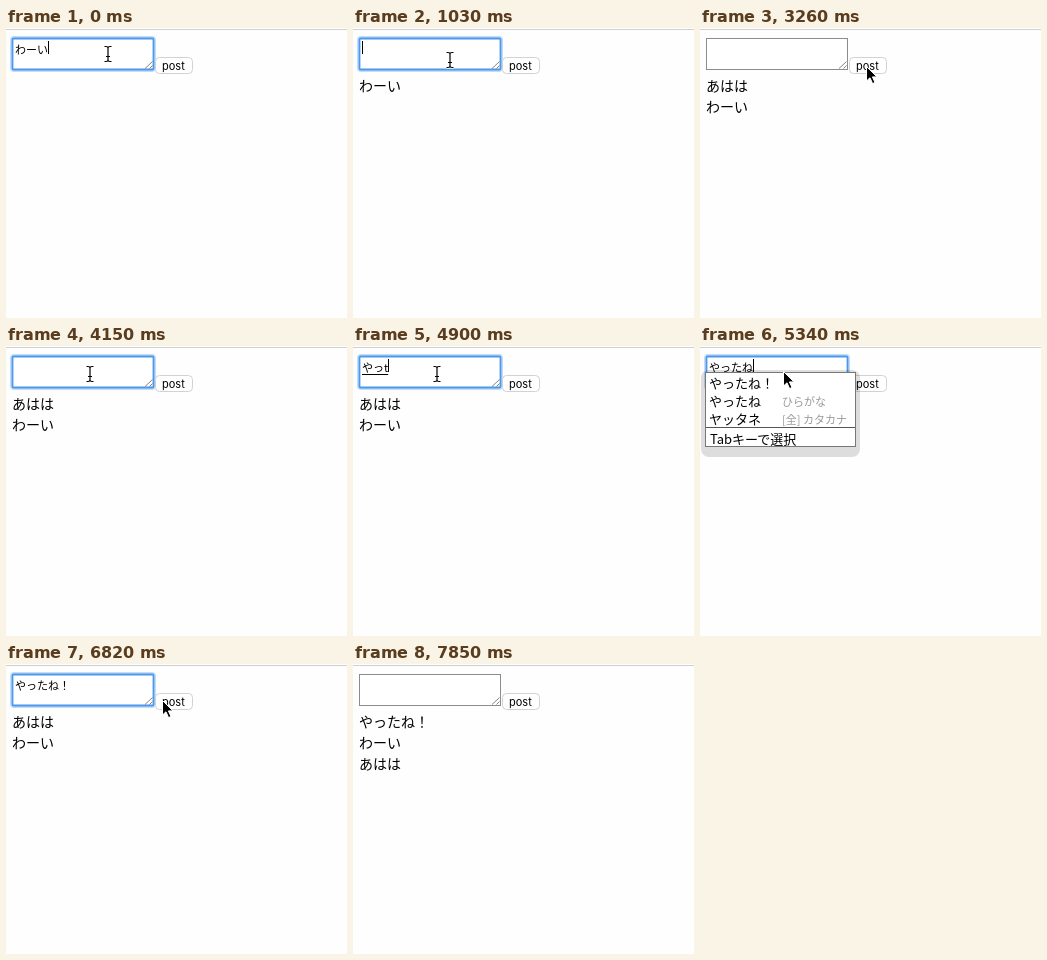
Recreate the animation shown at these times as an HTML page. Size 341x290 px, loop 8.76 s.

```html
<!DOCTYPE html>
<html lang="ja">
<head>
<meta charset="utf-8">
<style>
  html, body { margin: 0; width: 100%; height: 100%; overflow: hidden; background: #fefefe; }
  svg { display: block; width: 100%; height: 100%; }
  text { font-family: "Noto Sans CJK JP", "Noto Sans CJK", sans-serif; white-space: pre; }
  .entry { font-size: 11px; }
  .post { font-size: 14px; }
  .choice { font-size: 13px; }
  .note { font-size: 11px; fill: #999; }
  .button { font: 11px Inter, sans-serif; }
</style>
</head>
<body>
<svg id="stage" viewBox="0 0 341 290"></svg>
<script>
const LOOP = 8760;
const stage = document.getElementById('stage');

const beam = (x, y) => ({ cursor: 'beam', x, y });
const arrow = (x, y) => ({ cursor: 'arrow', x, y });
const compose = (text, kana = '', guess = '') => ({ text, kana, guess, composing: true, caret: true });
const commit = text => ({ text, kana: '', guess: '', composing: false, caret: true, picked: false });
const posted = (...posts) => ({ posts, text: '', focus: false, caret: false, pressed: false });
const focused = { focus: true, caret: true };

// Each entry changes part of the state left by the entries before it.
const timeline = [
  [0, { ...commit('わーい'), ...beam(102, 26), focus: true, posts: [], pressed: false }],
  [140, beam(122, 30)],
  [290, arrow(158, 36)],
  [430, arrow(167, 39)],
  [580, posted('わーい')],
  [880, beam(122, 36)],
  [1030, { ...beam(97, 32), ...focused }],
  [1480, compose('あ')],
  [1630, compose('あh')],
  [1780, { ...compose('あは', 'あは'), ...arrow(96, 29) }],
  [1930, compose('あはh', 'あは')],
  [2070, compose('あはは', 'あはは')],
  [2220, commit('あはは')],
  [2820, beam(112, 33)],
  [2970, arrow(152, 36)],
  [3110, arrow(166, 38)],
  [3260, posted('あはは', 'わーい')],
  [3560, beam(118, 34)],
  [3700, { ...beam(84, 28), ...focused }],
  [4150, { caret: false }],
  [4600, compose('や')],
  [4750, compose('やt')],
  [4890, compose('やっt')],
  [5040, { ...compose('やった', 'やった', 'やった！'), ...arrow(83, 25) }],
  [5190, compose('やったn', 'やった', 'やった！')],
  [5340, compose('やったね', 'やったね', 'やったね！')],
  [5780, { text: 'やったね！', picked: true }],
  [5930, commit('やったね！')],
  [6520, { ...beam(96, 29), caret: false }],
  [6670, arrow(134, 34)],
  [6820, arrow(156, 36)],
  [6960, { ...arrow(158, 38), pressed: true }],
  [7110, posted('やったね！', 'わーい', 'あはは')],
  [7550, arrow(186, 112)],
  [7700, arrow(228, 269)],
  [7850, { cursor: 'none' }]
];

const label = (kind, x, y, text, fill = '') =>
  `<text class="${kind}" x="${x}" y="${y}"${fill && ` style="fill:${fill}"`}>${text}</text>`;
const box = (x, y, w, h, attrs) =>
  `<rect x="${x}" y="${y}" width="${w}" height="${h}" ${attrs}/>`;
const katakana = kana =>
  kana.replace(/[ぁ-ん]/g, c => String.fromCharCode(c.charCodeAt(0) + 0x60));

function drawTextarea(s) {
  const ring = s.focus
    ? box(6, 10, 142, 32, 'rx="2" fill="none" stroke="#9cc8f8" stroke-opacity=".6" stroke-width="4"') +
      box(6.5, 10.5, 141, 31, 'rx="1" fill="#fff" stroke="#4c98ea" stroke-width="1.8"')
    : box(6.5, 10.5, 141, 31, 'fill="#fff" stroke="#8c8c8c"');
  return ring +
    '<path d="M139 40.5l7.5-7M143.5 40.5l3-3" stroke="#777" stroke-width=".9"/>' +
    `<text id="entry" class="entry" x="9" y="26">${s.text}</text><g id="caret"></g>`;
}

function drawButton(s) {
  const [fill, edge, ink] = s.pressed ? ['#3c8cf5', '#2b74dc', '#fff'] : ['#fff', '#d2d2d2', '#000'];
  return box(149.5, 29.5, 37, 16, `rx="4" fill="${fill}" stroke="${edge}"`) +
    label('button', 156, 42, 'post', ink);
}

function drawPopup(s) {
  if (!s.kana) return '';
  const rows = [[s.kana, 'ひらがな'], [katakana(s.kana), '[全] カタカナ']];
  if (s.guess) rows.unshift([s.guess, '']);
  const noteX = 17 + 13 * Math.max(...rows.map(r => r[0].length));
  const width = noteX + 68;
  const rule = 28 + 18 * rows.length;
  return box(1, 24, width + 9, rule - 4 + 9, 'rx="8" fill="#000" fill-opacity=".13"') +
    box(5.5, 26.5, width, rule - 8, 'fill="#fff" stroke="#777"') +
    (s.picked ? box(6, 28, width - 1, 18, 'fill="#2f78e4"') : '') +
    rows.map(([word, note], i) => {
      const y = 42 + 18 * i;
      return label('choice', 9, y, word, s.picked && !i ? '#fff' : '') + label('note', noteX, y - .5, note);
    }).join('') +
    box(6, rule - 1, width - 1, 1, 'fill="#555"') +
    label('choice', 10, rule + 16, 'Tabキーで選択');
}

function drawCursor({ cursor, x, y }) {
  if (cursor === 'none') return '';
  if (cursor === 'arrow') {
    return `<path transform="translate(${x} ${y})" stroke="#fff" d="M.5 .5V15L4 11.8 6.6 17.6 9 16.5 6.4 10.9H11Z"/>`;
  }
  const d = 'M-3.5-7.5H-2Q0-7.5 0-6 0-7.5 2-7.5H3.5M0-6V6M-3.5 7.5H-2Q0 7.5 0 6 0 7.5 2 7.5H3.5M-2 2.5H2';
  return `<g transform="translate(${x} ${y})" fill="none">` +
    `<path d="${d}" stroke="#fff" stroke-width="2.6"/><path d="${d}" stroke="#000" stroke-width="1.2"/></g>`;
}

function draw(s) {
  stage.innerHTML =
    box(0, 0, 341, 290, 'fill="#fefefe"') +
    box(0, 1, 341, 1, 'fill="#d0d0d0"') +
    drawTextarea(s) + drawButton(s) +
    s.posts.map((post, i) => label('post', 6, 63 + 21 * i, post)).join('') +
    drawPopup(s) + drawCursor(s);

  const width = s.text ? document.getElementById('entry').getComputedTextLength() : 0;
  document.getElementById('caret').innerHTML =
    (s.caret ? box(Math.round(9 + width), 13, 1, 13, '') : '') +
    (s.composing ? box(9, 28, width, 1, '') : '');
}

let shown = -1;
function tick() {
  const time = performance.now() % LOOP;
  const step = timeline.filter(([at]) => at <= time).length;
  if (step !== shown) {
    shown = step;
    draw(Object.assign({}, ...timeline.slice(0, step).map(([, change]) => change)));
  }
  requestAnimationFrame(tick);
}
tick();
</script>
</body>
</html>
```
